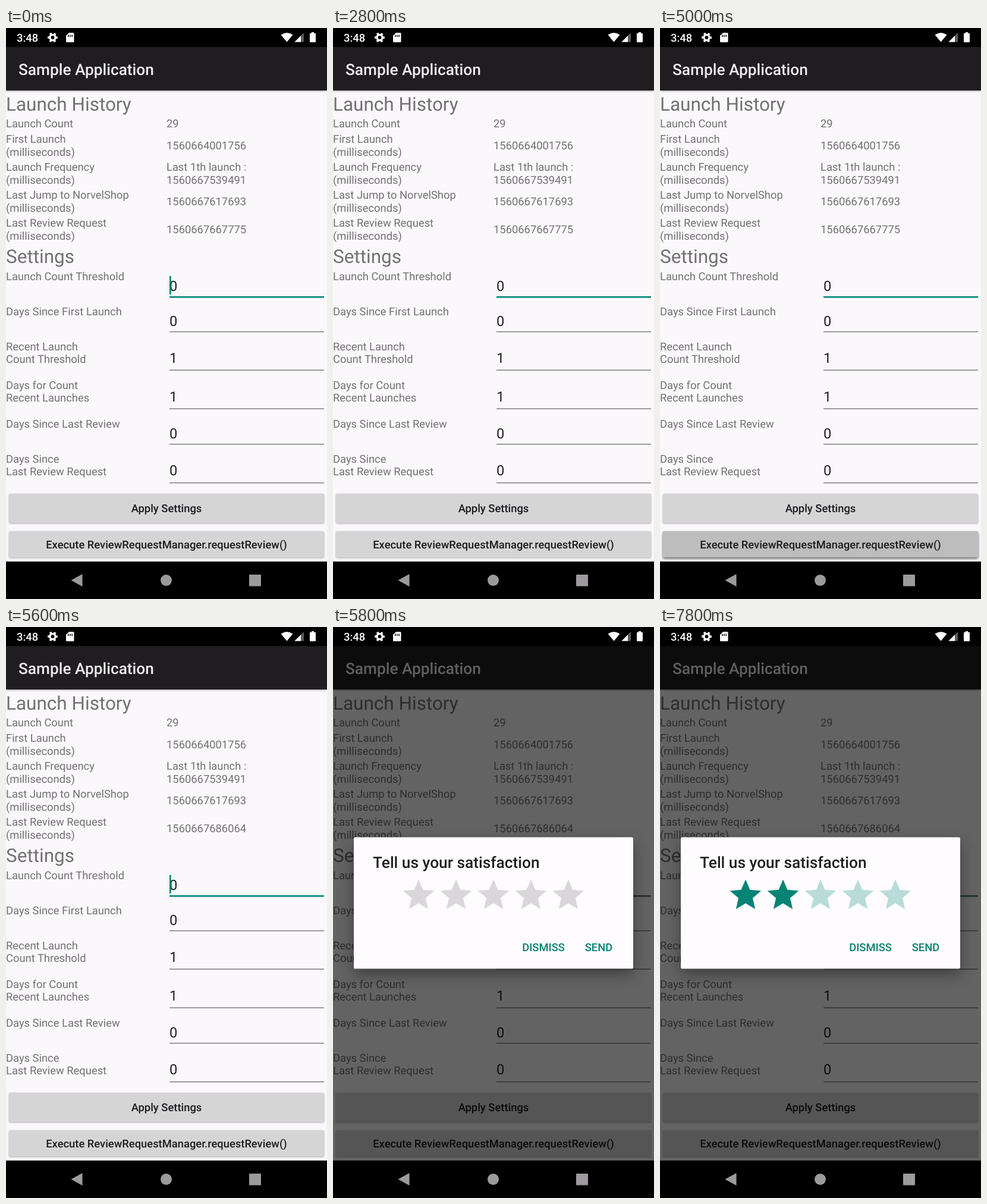
An HTML page that plays this animation: 540 by 960 pixels, repeating every 8 s.

```html
<!DOCTYPE html>
<html lang="en">
<head>
<meta charset="utf-8">
<title>Sample Application</title>
<style>
  html, body { margin: 0; width: 100%; height: 100%; overflow: hidden; background: #000; }
  svg { display: block; width: 540px; height: 960px; font-family: Roboto, sans-serif; text-rendering: geometricPrecision; }
  .label { font-size: 18.375px; fill: #727073; }
  .head { font-size: 31.5px; fill: #727073; }
  .field { font-size: 23.625px; fill: #1f1d20; }
  .title { font-size: 26.25px; font-weight: 500; }
  .btn { font-size: 18.375px; font-weight: 500; fill: #1d1b1e; text-anchor: middle; }
  .rule { fill: #777578; }
  .raised { filter: drop-shadow(0 1.4px 1.5px rgba(0, 0, 0, .34)); }
  .lifted { filter: drop-shadow(0 3px 2.5px rgba(0, 0, 0, .4)); }
  .bar { filter: drop-shadow(0 1px 1.5px rgba(0, 0, 0, .4)); }
  .card { filter: drop-shadow(0 10px 12px rgba(0, 0, 0, .36)); }

  /* one loop is 8 s, so 1.25% is one 100 ms step */
  .anim, .anim * { animation: 8s step-end infinite; }
  #cursor { animation-name: blink; }
  #lift { animation-name: lift; }
  #press { animation-name: press; }
  #ripple { animation-name: ripple; transform-origin: 270px 868px; }
  #before { animation-name: before; }
  #after { animation-name: after; }
  #focus { animation-name: focus; }
  #dim { animation-name: dim; }
  #dialog { animation-name: dialog; }
  #dialog .on { animation-name: rateOn; }
  #dialog .off { animation-name: rateOff; }

  @keyframes blink {
    0%, 13.75%, 26.25%, 38.75%, 65% { opacity: 1; }
    7.5%, 20%, 32.5%, 43.75%, 71.25%, 100% { opacity: 0; }
  }
  @keyframes lift { 0%, 70%, 100% { opacity: 0; } 41.25% { opacity: 1; } }
  @keyframes press {
    0%, 66.25%, 100% { opacity: 0; }
    41.25% { opacity: 1; }
    65% { opacity: .5; }
  }
  @keyframes ripple {
    0% { transform: scale(0); }
    41.25% { transform: scale(.32); }
    42.5% { transform: scale(.66); }
    43.75% { transform: scale(1); }
    62.5%, 100% { transform: scale(1.2); }
  }
  @keyframes before { 0% { opacity: 1; } 65%, 100% { opacity: 0; } }
  @keyframes after { 0% { opacity: 0; } 65%, 100% { opacity: 1; } }
  @keyframes focus { 0% { fill: #008577; } 72.5%, 100% { fill: #4f6f6d; } }
  @keyframes dim { 0% { opacity: 0; } 71.25% { opacity: .3; } 72.5%, 100% { opacity: .6; } }
  @keyframes dialog { 0% { opacity: 0; } 71.25% { opacity: .86; } 72.5%, 100% { opacity: 1; } }
  @keyframes rateOn { 0% { fill: #d9d7da; } 95%, 100% { fill: #058374; } }
  @keyframes rateOff { 0% { fill: #d9d7da; } 95%, 100% { fill: #b9dcd9; } }
</style>
</head>
<body>
<svg viewBox="0 0 540 960">
  <defs>
    <path id="star" d="M12 17.27L18.18 21l-1.64-7.03L22 9.24l-7.19-.61L12 2 9.19 8.63 2 9.24l5.46 4.73L5.82 21z" transform="scale(2.625)"/>
    <clipPath id="button"><rect x="5" y="846" width="530" height="44" rx="2.6"/></clipPath>
    <clipPath id="page"><rect y="32" width="540" height="865"/></clipPath>
  </defs>

  <rect width="540" height="960"/>

  <g clip-path="url(#page)">
    <rect y="32" width="540" height="865" fill="#faf8fb"/>
    <rect class="bar" y="20" width="540" height="85" fill="#201d20"/>
    <text class="title" x="21" y="78.5" fill="#efedf0">Sample Application</text>

    <g class="head">
      <text x="0" y="138.7">Launch History</text>
      <text x="0" y="394.7">Settings</text>
    </g>

    <g class="label">
      <text x="0" y="167">Launch Count</text>
      <text x="0" y="193">First Launch</text>
      <text x="0" y="214.5">(milliseconds)</text>
      <text x="0" y="240">Launch Frequency</text>
      <text x="0" y="261.5">(milliseconds)</text>
      <text x="0" y="287">Last Jump to NorvelShop</text>
      <text x="0" y="308.5">(milliseconds)</text>
      <text x="0" y="334">Last Review Request</text>
      <text x="0" y="355.5">(milliseconds)</text>

      <text x="270" y="167">29</text>
      <text x="270" y="203.7">1560664001756</text>
      <text x="270" y="240">Last 1th launch :</text>
      <text x="270" y="261.5">1560667539491</text>
      <text x="270" y="297.7">1560667617693</text>
      <g class="anim">
        <text id="before" x="270" y="344.7">1560667667775</text>
        <text id="after" x="270" y="344.7">1560667686064</text>
      </g>

      <text x="0" y="423.5">Launch Count Threshold</text>
      <text x="0" y="482.5">Days Since First Launch</text>
      <text x="0" y="541.5">Recent Launch</text>
      <text x="0" y="563">Count Threshold</text>
      <text x="0" y="606.5">Days for Count</text>
      <text x="0" y="628">Recent Launches</text>
      <text x="0" y="671.5">Days Since Last Review</text>
      <text x="0" y="730.5">Days Since</text>
      <text x="0" y="752">Last Review Request</text>
    </g>

    <g class="field">
      <text x="275" y="442">0</text>
      <text x="275" y="501">0</text>
      <text x="275" y="563">1</text>
      <text x="275" y="628">1</text>
      <text x="275" y="690">0</text>
      <text x="275" y="752">0</text>
    </g>
    <g class="rule">
      <rect x="275" y="510" width="260" height="1.4"/>
      <rect x="275" y="574.5" width="260" height="1.4"/>
      <rect x="275" y="639.5" width="260" height="1.4"/>
      <rect x="275" y="699" width="260" height="1.4"/>
      <rect x="275" y="764" width="260" height="1.4"/>
    </g>
    <g class="anim" fill="#008577">
      <rect id="focus" x="275" y="451" width="260" height="2.6"/>
      <rect id="cursor" x="275" y="417" width="2.6" height="31"/>
    </g>

    <rect class="raised" x="5" y="783" width="530" height="49" rx="2.6" fill="#d5d5d6"/>
    <text class="btn" x="270" y="814">Apply Settings</text>

    <rect class="raised" x="5" y="846" width="530" height="44" rx="2.6" fill="#d5d5d6"/>
    <g class="anim">
      <rect id="lift" class="lifted" x="5" y="846" width="530" height="44" rx="2.6" fill="#d5d5d6"/>
      <g id="press" clip-path="url(#button)">
        <rect x="5" y="846" width="530" height="44" fill="#cacacb"/>
        <circle id="ripple" cx="269" cy="868" r="253.5" fill="#bdbdbe"/>
      </g>
    </g>
    <text class="btn" x="270" y="875">Execute ReviewRequestManager.requestReview()</text>

    <g class="anim">
      <rect id="dim" y="32" width="540" height="865"/>
      <g id="dialog">
        <rect class="card" x="35" y="353.5" width="470" height="221" rx="2.6" fill="#fefcff"/>
        <text class="title" x="67" y="405" fill="#201e21">Tell us your satisfaction</text>
        <g transform="translate(112.5 419.2)">
          <use class="on" href="#star"/>
          <use class="on" href="#star" x="63"/>
          <use class="off" href="#star" x="126"/>
          <use class="off" href="#star" x="189"/>
          <use class="off" href="#star" x="252"/>
        </g>
        <text class="btn" x="354" y="544.5" style="fill:#088072">DISMISS</text>
        <text class="btn" x="447" y="544.5" style="fill:#088072">SEND</text>
      </g>
    </g>
  </g>

  <!-- status bar -->
  <g fill="#fff">
    <text x="18" y="22.5" font-size="18.375" font-weight="500">3:48</text>
    <g transform="translate(78.5 16)">
      <circle r="4.6" fill="none" stroke="#fff" stroke-width="3.4"/>
      <circle r="6.9" fill="none" stroke="#fff" stroke-width="3" stroke-dasharray="3.6 3.625" stroke-dashoffset="1.8"/>
    </g>
    <path d="M106 8h7q1.500 0 1.500 1.500v13q0 1.500-1.500 1.500h-10.500q-1.500 0-1.500-1.500v-9.500z"/>
    <path d="M104.800 11.500v3.500M108 11.500v3.500M111.200 11.500v3.500" stroke="#000" stroke-width="1.500"/>
    <path d="M462.500 11.500Q472.500 4.500 482.500 11.500L472.500 23.500z"/>
    <path d="M501 8V23.500H485.500z" fill="#5d5d5d"/>
    <path d="M496 13V23.500H485.500z"/>
    <path d="M514 7h4v1.800h2q1 0 1 1v13.200q0 1-1 1h-8q-1 0-1-1v-13.200q0-1 1-1h2z"/>
  </g>

  <!-- navigation bar -->
  <g fill="#9c9a9d">
    <path d="M109.500 928.500L128.500 918V939z"/>
    <circle cx="269.500" cy="928.500" r="9.500"/>
    <rect x="409" y="919" width="20" height="19.500" rx="1"/>
  </g>
</svg>
</body>
</html>
```
